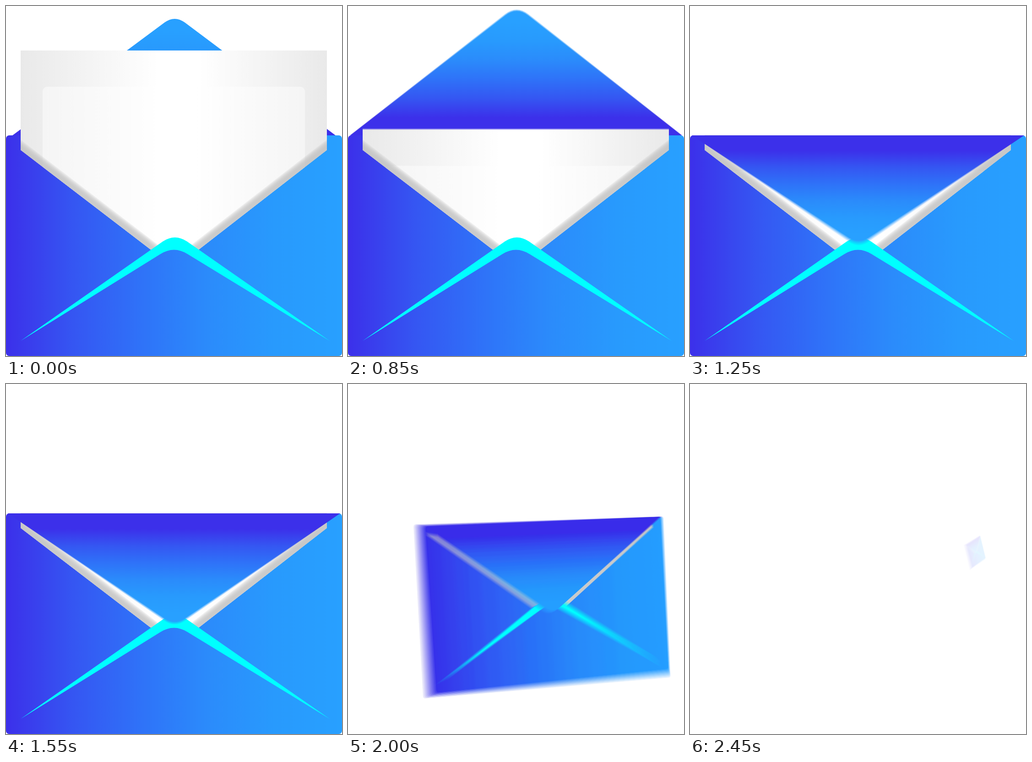
An HTML page with a canvas that plays this animation: 734x763 px, repeating every 2500 ms.

```html
<!DOCTYPE html>
<html lang="en">
<head>
<meta charset="utf-8">
<title>Envelope</title>
<style>
  html, body { margin: 0; width: 100%; height: 100%; overflow: hidden; background: #fff; }
  #stage, .layer { position: absolute; inset: 0; overflow: hidden; background: #fff; }
  canvas { position: absolute; left: 0; top: 0; transform-origin: 367px 522.5px; }
</style>
</head>
<body>
<div id="stage"></div>
<script>
const W = 734, H = 763, TOP = 282;
const LOOP = 2500, STEP = 50, SHUTTER = 25, SAMPLES = 10;
const FLIGHT = 1700;
const BLUES = ["#3c30ea", "#3556f2", "#2f72f8", "#2b8bfb", "#289afd", "#28a0ff"];

const clamp = (v, lo = 0, hi = 1) => Math.min(hi, Math.max(lo, v));

// Ease in and out; a higher power makes the middle steeper.
function ease(u, power) {
  u = clamp(u);
  const a = u ** power, b = (1 - u) ** power;
  return a / (a + b);
}

const paperTop = t => 97 + 184 * ease(t / 1185, 2.8);

// The flap turns over its hinge, swings a little too far and settles.
function flapAngle(t) {
  const turn = 1 / (1 + Math.exp((1010 - t) / 64));
  const overshoot = .27 * Math.sin(Math.PI * clamp((t - 1050) / 600));
  return -.155 + (Math.PI + .155) * turn + overshoot;
}

// Tip of the flap seen in perspective from above the hinge.
function flapPose(t) {
  const length = 267, eyeY = 150, distance = 520, angle = flapAngle(t);
  const zoom = distance / (distance - length * Math.sin(angle));
  return {
    tip: eyeY + (TOP - eyeY - length * Math.cos(angle)) * zoom,
    round: 24 * zoom,
    inset: Math.max(4, 8 - 40 * angle)
  };
}

// The closed envelope shrinks and turns away to the right.
function flight(t) {
  const e = ease((t - FLIGHT) / 840, 1.6), turn = e ** 1.2;
  return `translate(${266 * e}px, ${-162 * e}px) perspective(1600px)
    rotateZ(${-.25 * turn}rad) rotateX(${-.19 * turn}rad) rotateY(${1.15 * turn}rad)
    scale(${1 - .92 * e})`;
}

function blues(g, x0, y0, x1, y1) {
  const fill = g.createLinearGradient(x0, y0, x1, y1);
  BLUES.forEach((color, i) => fill.addColorStop(i / (BLUES.length - 1), color));
  return fill;
}

// Horizontal shade with a white middle.
function glow(g, left, right, edge) {
  const fill = g.createLinearGradient(left, 0, right, 0);
  fill.addColorStop(0, edge);
  fill.addColorStop(.45, "#fff");
  fill.addColorStop(.58, "#fff");
  fill.addColorStop(1, edge);
  return fill;
}

function box(g, x, y, w, h, r, fill) {
  g.fillStyle = fill;
  g.beginPath();
  g.roundRect(x, y, w, h, r);
  g.fill();
}

function drawFlap(g, { tip, round, inset }) {
  const mid = 368.5, height = tip - TOP;
  const sag = round / 2 * height / (mid - inset - round / 2);
  g.fillStyle = blues(g, 0, TOP + .14 * height, 0, TOP + .9 * height);
  g.beginPath();
  g.moveTo(inset, TOP);
  g.lineTo(mid - round, tip - sag);
  g.quadraticCurveTo(mid, tip + sag, mid + round, tip - sag);
  g.lineTo(W - inset, TOP);
  g.fill();
}

function drawPaper(g, top) {
  g.save();
  g.clip(new Path2D("M32 0V314L316 531L369 515L421 531L701 314V0Z"));
  box(g, 32, top, 669, H, 0, glow(g, 32, 701, "#e9e9e9"));
  box(g, 80, top + 79, 573, H, 10, glow(g, 80, 653, "#f5f5f5"));
  // Soft shade along the pocket edge
  g.beginPath();
  g.rect(32, top, 669, H);
  g.clip();
  g.strokeStyle = "rgba(192,192,192,.25)";
  const edge = new Path2D("M-8 284L369 571.5L741 283");
  for (let w = 8; w <= 18; w += 2) {
    g.lineWidth = 2 * w;
    g.stroke(edge);
  }
  g.restore();
}

function drawEnvelope(g, t) {
  const flap = flapPose(t);
  g.clearRect(0, 0, W, H);
  if (flap.tip < TOP) drawFlap(g, flap);
  box(g, 0, TOP, W, H - TOP, 7, blues(g, 0, 0, W, 0));
  drawPaper(g, paperTop(t));
  g.fillStyle = "#0ff";
  g.fill(new Path2D("M32 730L343 513Q369 496 395 513L707 730L397 541Q367 522 337 541Z"));
  if (flap.tip > TOP) drawFlap(g, flap);
}

// Stacked white sheets with opacity 1, 1/2, 1/3 … average into motion blur.
const stage = document.getElementById("stage");
const layers = Array.from({ length: SAMPLES }, (_, i) => {
  const sheet = document.createElement("div");
  const canvas = document.createElement("canvas");
  sheet.className = "layer";
  sheet.style.opacity = 1 / (i + 1);
  canvas.width = W;
  canvas.height = H;
  sheet.append(canvas);
  stage.append(sheet);
  return { canvas, g: canvas.getContext("2d") };
});

function render(t) {
  layers.forEach(({ canvas, g }, i) => {
    const at = t + (i / (SAMPLES - 1) - .5) * SHUTTER;
    drawEnvelope(g, at);
    canvas.style.transform = at > FLIGHT ? flight(at) : "none";
  });
  stage.style.opacity = clamp((2480 - t) / 240);
}

const start = performance.now();
let shown = -1;
function tick() {
  const t = Math.floor((performance.now() - start) % LOOP / STEP) * STEP;
  if (t !== shown) render(shown = t);
  requestAnimationFrame(tick);
}
tick();
</script>
</body>
</html>
```
